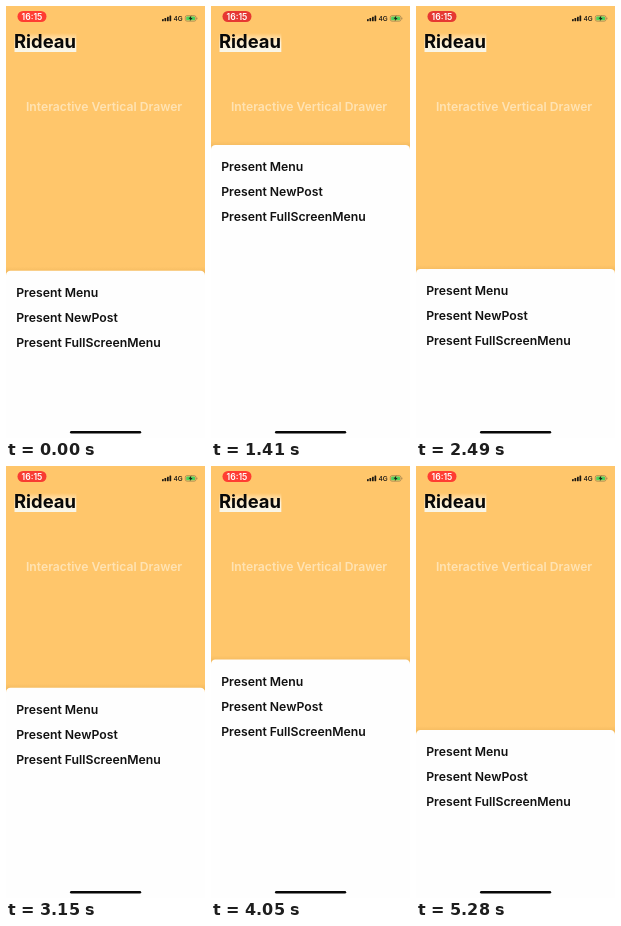
An HTML page for the animation above (5.31 s loop, 199 by 432 pixels).

```html
<!DOCTYPE html>
<html lang="en">
<head>
<meta charset="utf-8">
<title>Vertical drawer</title>
<style>
  html, body { margin: 0; width: 100%; height: 100%; overflow: hidden; background: #ffc66b; }
  svg { display: block; width: 100vw; height: 100vh; }
  text { font-family: Inter, Roboto, "Liberation Sans", sans-serif; font-weight: 600; fill: #111; }
  .title { font-size: 18.4px; font-weight: 700; fill: #080808; }
  .subtitle { font-size: 12.15px; fill: #ffe3b3; }
  .menu { font-size: 12.25px; }
  .clock { font-size: 8.6px; fill: #fff; text-anchor: middle; }
  .network { font-size: 6.6px; font-weight: 500; }
</style>
</head>
<body>
<svg viewBox="0 0 199 432" preserveAspectRatio="none">
  <defs>
    <linearGradient id="glow" x1="0" y1="0" x2="0" y2="1">
      <stop offset="0" stop-color="#fff5df" stop-opacity="0"/>
      <stop offset=".5" stop-color="#fff5df" stop-opacity=".9"/>
      <stop offset="1" stop-color="#f8f6ea"/>
    </linearGradient>
    <linearGradient id="shade" x1="0" y1="0" x2="0" y2="1">
      <stop offset="0" stop-color="#b07820" stop-opacity="0"/>
      <stop offset="1" stop-color="#b07820" stop-opacity=".16"/>
    </linearGradient>
  </defs>
  <rect width="199" height="432" fill="#ffc66b"/>

  <rect x="8.5" y="27" width="61.8" height="19" fill="url(#glow)"/>
  <text class="title" x="8" y="41.6">Rideau</text>
  <text class="subtitle" x="20" y="105.3">Interactive Vertical Drawer</text>

  <rect id="pill" x="11.5" y="5" width="29" height="11" rx="5.5"/>
  <text class="clock" x="26" y="13.5">16:15</text>
  <g fill="#1b1710">
    <rect x="156" y="13" width="1.7" height="2.2" rx=".4"/>
    <rect x="158.5" y="12" width="1.7" height="3.2" rx=".4"/>
    <rect x="161" y="10.8" width="1.7" height="4.4" rx=".4"/>
    <rect x="163.5" y="9.5" width="1.7" height="5.7" rx=".4"/>
  </g>
  <text class="network" x="167.5" y="14.9">4G</text>
  <rect x="179.3" y="9.6" width="10.6" height="5.6" rx="1.7" fill="none" stroke="#8a7448" stroke-width=".6"/>
  <rect x="180.2" y="10.5" width="8.8" height="3.8" rx=".9" fill="#4cd05c"/>
  <path d="M185.4 9.6l-2.8 3.2h1.8l-.7 2.5 2.9-3.3h-1.8z" fill="#1b1710"/>
  <rect x="190.5" y="11.4" width=".8" height="2" rx=".4" fill="#8a7448"/>

  <g id="drawer">
    <rect y="-4" width="199" height="6" fill="url(#shade)"/>
    <rect width="199" height="440" rx="4.5" fill="#fefefe"/>
    <g class="menu">
      <text x="10.2" y="26.3">Present Menu</text>
      <text x="10.2" y="51.3">Present NewPost</text>
      <text x="10.2" y="76.3">Present FullScreenMenu</text>
    </g>
  </g>
  <rect x="64" y="425" width="71.2" height="2.6" rx="1.3" fill="#080808"/>
</svg>
<script>
  const LOOP = 5310, STEP = 30;

  // [time in ms, top edge of the drawer]
  const dragPath = [
    [0, 264.7], [510, 270], [810, 247], [1080, 194], [1410, 139], [1680, 76],
    [1890, 99.5], [2160, 190], [2490, 263], [2700, 263], [2970, 256], [3240, 193],
    [3510, 39], [3660, 39], [4050, 193.5], [4320, 250], [4590, 262], [4860, 263],
    [5040, 270], [5280, 264.1]
  ];
  // [time in ms, dimming of the recording pill]
  const pulsePath = [
    [0, 0], [360, 1], [870, 0], [1410, 1], [1890, 0], [2490, 1],
    [3510, 0], [3780, 1], [4050, 0], [4650, 1], [5280, 0]
  ];

  // Cyclic cubic curve that never overshoots its points.
  function curve(points) {
    const n = points.length;
    const at = i => {
      const turn = Math.floor(i / n), [t, v] = points[i - turn * n];
      return [t + turn * LOOP, v];
    };
    const slope = i => {
      const [t0, v0] = at(i), [t1, v1] = at(i + 1);
      return (v1 - v0) / (t1 - t0);
    };
    const tangent = i => {
      const a = slope(i - 1), b = slope(i);
      return a * b > 0 ? 2 * a * b / (a + b) : 0;
    };
    return time => {
      let i = n - 1;
      while (points[i][0] > time) i--;
      const [t0, v0] = at(i), [t1, v1] = at(i + 1);
      const h = t1 - t0, u = (time - t0) / h, w = 1 - u;
      return v0 * w * w * (1 + 2 * u) + v1 * u * u * (1 + 2 * w)
        + h * u * w * (w * tangent(i) - u * tangent(i + 1));
    };
  }

  const drawerTop = curve(dragPath), pillDim = curve(pulsePath);
  const drawer = document.getElementById("drawer");
  const pill = document.getElementById("pill");
  const start = performance.now();

  function draw() {
    const elapsed = Math.max(0, performance.now() - start) % LOOP;
    const time = Math.floor(elapsed / STEP) * STEP;
    const dim = pillDim(time);
    drawer.setAttribute("transform", `translate(0 ${drawerTop(time).toFixed(2)})`);
    pill.setAttribute("fill", `rgb(${255 - 25 * dim}, ${61 - 5 * dim}, 50)`);
    requestAnimationFrame(draw);
  }
  draw();
</script>
</body>
</html>
```
